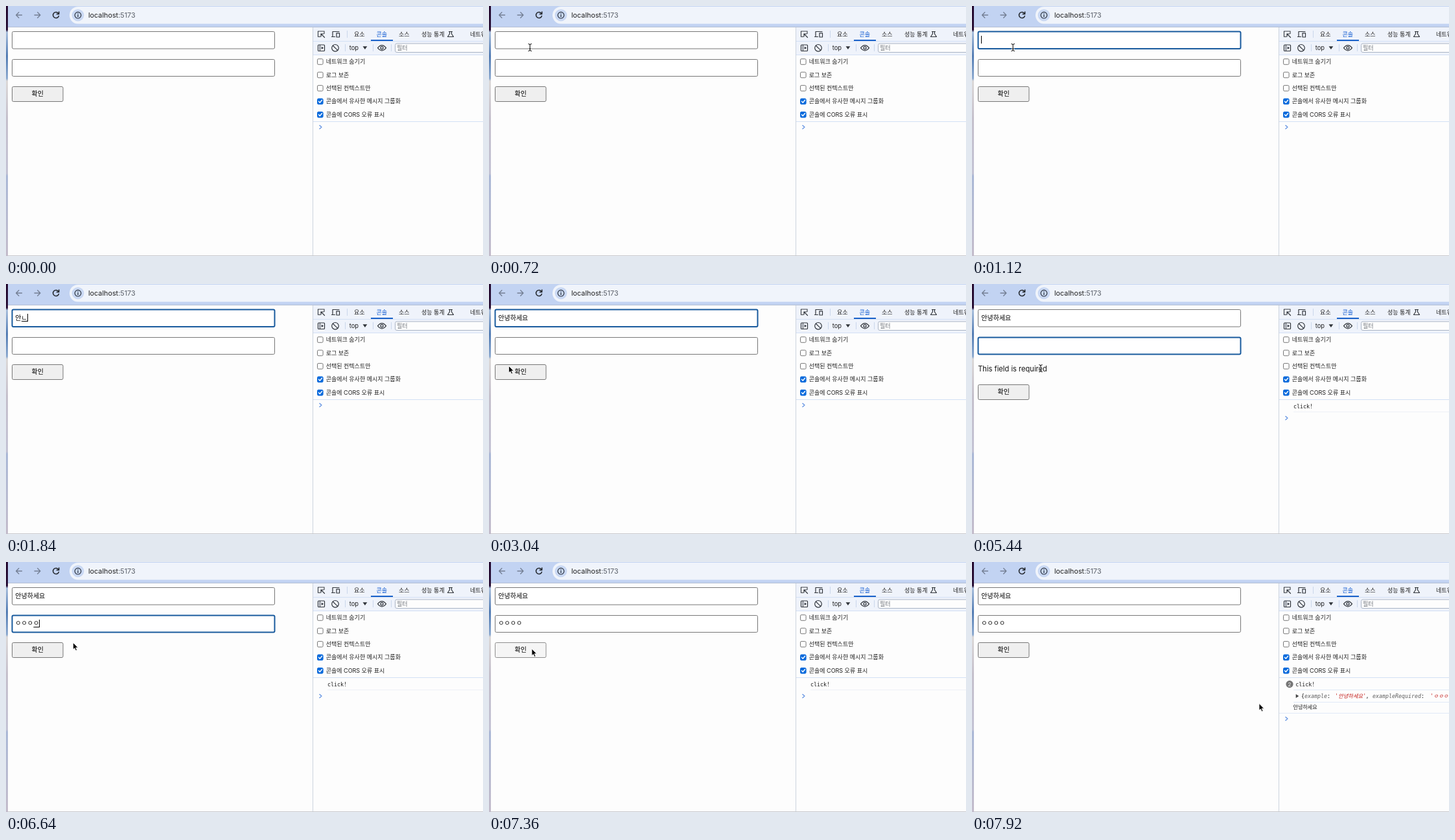
An HTML page that plays this animation: 736 px wide and 386 px high, repeating every 8 s.

```html
<!DOCTYPE html>
<html lang="ko">
<head>
<meta charset="utf-8">
<title>Form validation</title>
<style>
html, body { margin: 0; width: 100%; height: 100%; overflow: hidden; background: #fdfdfd; }
svg { display: block; width: 736px; height: 386px; }
text { font: 9px Inter, "Noto Sans CJK KR", "Noto Sans CJK", sans-serif; fill: #1f1f1f; white-space: pre; }
.field text, .button text { font-size: 10px; fill: #000; }
.field rect { fill: #fff; stroke: #767676; }
.field.focus rect { stroke: #185a9d; stroke-width: 2; }
.button rect { fill: #efefef; stroke: #767676; }
.button.down rect { fill: #f5f5f5; stroke: #8d8d8d; }
.mono, .mono tspan { font: 8.3px "DejaVu Sans Mono", "Noto Sans CJK KR", "Noto Sans CJK", monospace; }
.mono .key { font-style: italic; fill: #5f5f5f; }
.mono .str { font-style: italic; fill: #c5221f; }
.line { fill: none; stroke-linecap: round; stroke-linejoin: round; }
.dark { stroke: #30343a; stroke-width: 1.2; }
</style>
</head>
<body>
<svg viewBox="0 0 736 386">
  <defs>
    <linearGradient id="desk" x2="0" y2="1">
      <stop offset="0" stop-color="#24092f"/>
      <stop offset=".095" stop-color="#2a1238"/>
      <stop offset=".105" stop-color="#a9bfdc"/>
      <stop offset=".2" stop-color="#547db4"/>
      <stop offset=".29" stop-color="#8eabd0"/>
      <stop offset=".3" stop-color="#dcd9d8"/>
      <stop offset=".45" stop-color="#c5c0cc"/>
      <stop offset=".67" stop-color="#c3c2d4"/>
      <stop offset=".68" stop-color="#aab8d6"/>
      <stop offset=".8" stop-color="#b4bad2"/>
      <stop offset="1" stop-color="#c4bccb"/>
    </linearGradient>
  </defs>
  <rect width="736" height="386" fill="#fdfdfd"/>
  <rect width="3" height="386" fill="url(#desk)"/>

  <g id="browser">
    <rect x="3" width="733" height="32.5" fill="#c2d3f2"/>
    <path d="M3 32.5H736" stroke="#b3bfd4"/>
    <rect x="98" y="1" width="660" height="26.5" rx="13.2" fill="#f0f4fb"/>
    <g class="line" stroke="#747f94" stroke-width="1.3">
      <path d="M24.5 14H15.7M19.8 9.8L15.6 14L19.8 18.2"/>
      <path d="M44 14H52.8M48.7 9.8L52.9 14L48.7 18.2"/>
    </g>
    <path class="line" d="M80.7 11.3A4.5 4.5 0 1 0 81.4 15.4M81.7 9V12.4H78.3" stroke="#22262c" stroke-width="1.5"/>
    <circle cx="111" cy="14.2" r="9.3" fill="#c9d8f3"/>
    <circle cx="111" cy="14.2" r="4.8" fill="none" stroke="#2c3440" stroke-width="1.2"/>
    <path d="M111 13.5V17M111 11.2V12.4" stroke="#2c3440" stroke-width="1.3"/>
    <text x="127" y="18" style="font-size:10.8px">localhost<tspan fill="#5a5f68">:5173</tspan></text>
  </g>

  <g id="tools">
    <rect x="473" y="33" width="263" height="42" fill="#eff3fb"/>
    <path d="M473 54.5H736M473 75.5H736M473 178.5H736" stroke="#d3e0f5"/>
    <path d="M473.5 33V386" stroke="#ccd4df"/>
    <path d="M526.5 38V49M523.5 59V70M566.5 59V70M594.5 59V70" stroke="#cad6eb"/>
    <path class="line dark" d="M485 47.5H481.5V39H491V42.5" stroke-dasharray="1.5 1.1"/>
    <path class="line dark" d="M491.5 48.5L486 43M486 47V43H490"/>
    <path class="line dark" d="M504 46.5V39.5H514M502.5 47.5H507.5M510 41.8H514.5V48H510Z"/>
    <rect class="line dark" x="481.5" y="60" width="10" height="9.5" rx="1"/>
    <path d="M484.4 60V69.5" stroke="#30343a"/>
    <path d="M486.7 62.5L490 64.8L486.7 67Z" fill="#30343a"/>
    <circle class="line dark" cx="508" cy="64.8" r="5.3"/>
    <path class="line dark" d="M504.4 61.2L511.7 68.4"/>
    <path d="M550.5 62.3H557.3L553.9 67Z" fill="#30343a"/>
    <path class="line dark" d="M573.5 64.7Q580 56.5 586.5 64.7Q580 73 573.5 64.7Z"/>
    <circle class="line dark" cx="580" cy="64.7" r="2"/>
    <path class="line dark" d="M683.5 39.5H688.5M684.5 39.5V43L681.5 47.5H690.5L687.5 43V39.5"/>
    <rect x="600.5" y="58" width="150" height="13.5" rx="2.5" fill="#fdfdfd" stroke="#aab4c4"/>
    <path d="M563 53H597" stroke="#1a62c9" stroke-width="2"/>
    <text x="537" y="46.8">요소</text>
    <text x="571.5" y="46.8" style="fill:#0b57d0">콘솔</text>
    <text x="606" y="46.8">소스</text>
    <text x="641" y="46.8">성능 통계</text>
    <text x="716" y="46.8">네트워크</text>
    <text x="529.7" y="68" style="font-size:9.4px">top</text>
    <text x="603" y="68" style="fill:#70757c">필터</text>
    <g id="options"></g>
  </g>

  <g id="log1">
    <path d="M496 197.5H736" stroke="#edf1f7"/>
    <text id="click" class="mono" y="191.7">click!</text>
  </g>
  <g id="log2">
    <path d="M496 197.5H736M496 216.5H736M474 233.5H736" stroke="#e0e9f7"/>
    <circle cx="490" cy="188.6" r="5.6" fill="#757575"/>
    <text x="490" y="191.6" text-anchor="middle" style="font-size:8px;fill:#fff">2</text>
    <path d="M499.7 204L504.3 207L499.7 210Z" fill="#444"/>
    <text class="mono" y="209.8"><tspan x="508">{</tspan><tspan class="key" x="513">example</tspan><tspan x="548">: </tspan><tspan class="str" x="560">'안녕하세요'</tspan><tspan x="607.5">,</tspan><tspan class="key" x="618">exampleRequired</tspan><tspan x="693">:</tspan><tspan class="str" x="707">'ㅇㅇㅇㅇ'</tspan></text>
    <text x="495.5" y="227.3" style="font-size:8.1px">안녕하세요</text>
  </g>
  <path id="prompt" class="line" d="M483.8 -2.7L487 0L483.8 2.7" stroke="#5b8de0" stroke-width="1.2"/>

  <g class="field">
    <rect x="9.5" y="39.5" width="405" height="26.5" rx="2"/>
    <text x="14.3" y="55.6"></text>
    <path stroke="#000"/>
  </g>
  <g class="field">
    <rect x="9.5" y="82.5" width="405" height="26" rx="2"/>
    <text x="14.3" y="98.4"></text>
    <path stroke="#000"/>
  </g>
  <text id="error" x="9.2" y="135.4" style="font-size:11.1px;fill:#111">This field is required</text>
  <g class="button" id="button">
    <rect x="9.5" y="124.5" width="78.5" height="23" rx="2"/>
    <text x="48.7" y="139.2" text-anchor="middle">확인</text>
  </g>
  <path d="M3 385.5H736" stroke="#c8c8cc"/>

  <path id="arrow" d="M0 0V10.6L2.4 8.4L4.2 12.4L6 11.6L4.3 7.7H7.6Z" fill="#000" stroke="#fff" stroke-width=".8"/>
  <g id="beam" class="line">
    <path d="M-2.3 -5.5Q0 -5.5 0 -4Q0 -5.5 2.3 -5.5M0 -4V4M-2.3 5.5Q0 5.5 0 4Q0 5.5 2.3 5.5M-1.2 2H1.2" stroke="#fff" stroke-width="2.2"/>
    <path d="M-2.3 -5.5Q0 -5.5 0 -4Q0 -5.5 2.3 -5.5M0 -4V4M-2.3 5.5Q0 5.5 0 4Q0 5.5 2.3 5.5M-1.2 2H1.2" stroke="#000"/>
  </g>
</svg>
<script>
const LOOP = 8000, STEP = 80, BLINK = 500, ADVANCE = 9.2;
const FOCUS = 960, CLICK = 3480, VALID = 5840, PRESS = 7360, SUBMIT = 7520;

// Each entry: time, text in the field, whether the last letter is being composed
const typing = [
  [[FOCUS, "", 0], [1440, "ㅇ", 1], [1520, "아", 1], [1680, "안", 1], [1800, "안ㄴ", 1],
   [1880, "안녀", 1], [1960, "안녕", 1], [2000, "안녕ㅎ", 1], [2040, "안녕하", 1],
   [2080, "안녕핫", 1], [2120, "안녕하세", 1], [2160, "안녕하셍", 1], [2200, "안녕하세요", 1],
   [2220, "안녕하세요", 0]],
  [[CLICK, "", 0], [VALID, "ㅇ", 1], [6000, "ㅇㅇ", 1], [6240, "ㅇㅇㅇ", 1],
   [6480, "ㅇㅇㅇㅇ", 1], [PRESS, "ㅇㅇㅇㅇ", 0]]
];

// Pointer strokes: start, end, from, to; the pointer rests until the next one
const strokes = [
  [80, 640, [1, 190], [63.2, 64]],
  [3040, 3360, [30.5, 126.5], [36.3, 138]],
  [4720, 5520, [36.3, 138], [108, 130]],
  [6640, 7040, [103.5, 124.5], [66, 134]],
  [7520, 7920, [66, 134], [443, 218.5]]
];
const hidden = [[0, 80], [1440, 3040], [VALID, 6640]];

const $ = id => document.getElementById(id);
const show = (el, on) => el.style.display = on ? "" : "none";
const within = (t, [a, b]) => t >= a && t < b;
const ease = p => p * p * (3 - 2 * p);
const fields = [...document.querySelectorAll(".field")];

const options = ["네트워크 숨기기", "로그 보존", "선택된 컨텍스트만", "콘솔에서 유사한 메시지 그룹화", "콘솔에 CORS 오류 표시"];
$("options").innerHTML = options.map((label, i) => {
  const y = 86 + i * 20.45, on = i > 2;
  return `<rect x="480.5" y="${y - 4.3}" width="8.6" height="8.6" rx="1.6"
      fill="${on ? "#0b6bdc" : "#fff"}" stroke="${on ? "#0b6bdc" : "#767676"}"/>
    ${on ? `<path class="line" d="M482.5 ${y}l1.8 1.9l3.2 -4" stroke="#fff" stroke-width="1.4"/>` : ""}
    <text x="493.7" y="${y + 3.1}">${label}</text>`;
}).join("");

function drawField(i, t, focused) {
  const [box, label, marks] = fields[i].children;
  const [since, text, composing] = typing[i].findLast(k => k[0] <= t) || [0, "", 0];
  const end = 14.8 + text.length * ADVANCE, top = i ? 89 : 46;
  const caret = focused && Math.floor((t - since) / BLINK) % 2 === 0;
  fields[i].classList.toggle("focus", focused);
  label.textContent = text;
  marks.setAttribute("d",
    (caret ? `M${Math.floor(end) + .5} ${top}v12` : "") +
    (composing ? `M${end - ADVANCE} ${top + 11.5}h${ADVANCE}` : "") || "M0 0");
}

function drawPointer(t, error) {
  const [a, b, from, to] = strokes.findLast(s => s[0] <= t) || strokes[0];
  const p = ease(Math.min(1, Math.max(0, (t - a) / (b - a))));
  const [x, y] = from.map((v, i) => v + (to[i] - v) * p);
  const overField = x > 9 && x < 415 && (within(y, [39, 67]) || within(y, [82, 109]));
  const overText = error && x > 9 && x < 117 && within(y, [124, 140]);
  const visible = !hidden.some(h => within(t, h)), text = overField || overText;
  show($("beam"), visible && text);
  show($("arrow"), visible && !text);
  $(text ? "beam" : "arrow").setAttribute("transform", `translate(${x} ${y})`);
}

function draw(time) {
  const t = Math.floor(time % LOOP / STEP) * STEP;
  const error = within(t, [CLICK, VALID]), sent = t >= SUBMIT;
  drawField(0, t, within(t, [FOCUS, CLICK]));
  drawField(1, t, within(t, [CLICK, PRESS]));
  show($("error"), error);
  $("button").setAttribute("transform", `translate(0 ${error ? 31 : 0})`);
  $("button").classList.toggle("down", within(t, [3400, CLICK]) || within(t, [PRESS, SUBMIT]));
  show($("log1"), t >= CLICK);
  show($("log2"), sent);
  $("click").setAttribute("x", sent ? 499.3 : 496);
  $("prompt").setAttribute("transform", `translate(0 ${sent ? 242 : t >= CLICK ? 207 : 187})`);
  drawPointer(t, error);
}

function tick() {
  draw(performance.now());
  requestAnimationFrame(tick);
}
tick();
</script>
</body>
</html>
```
